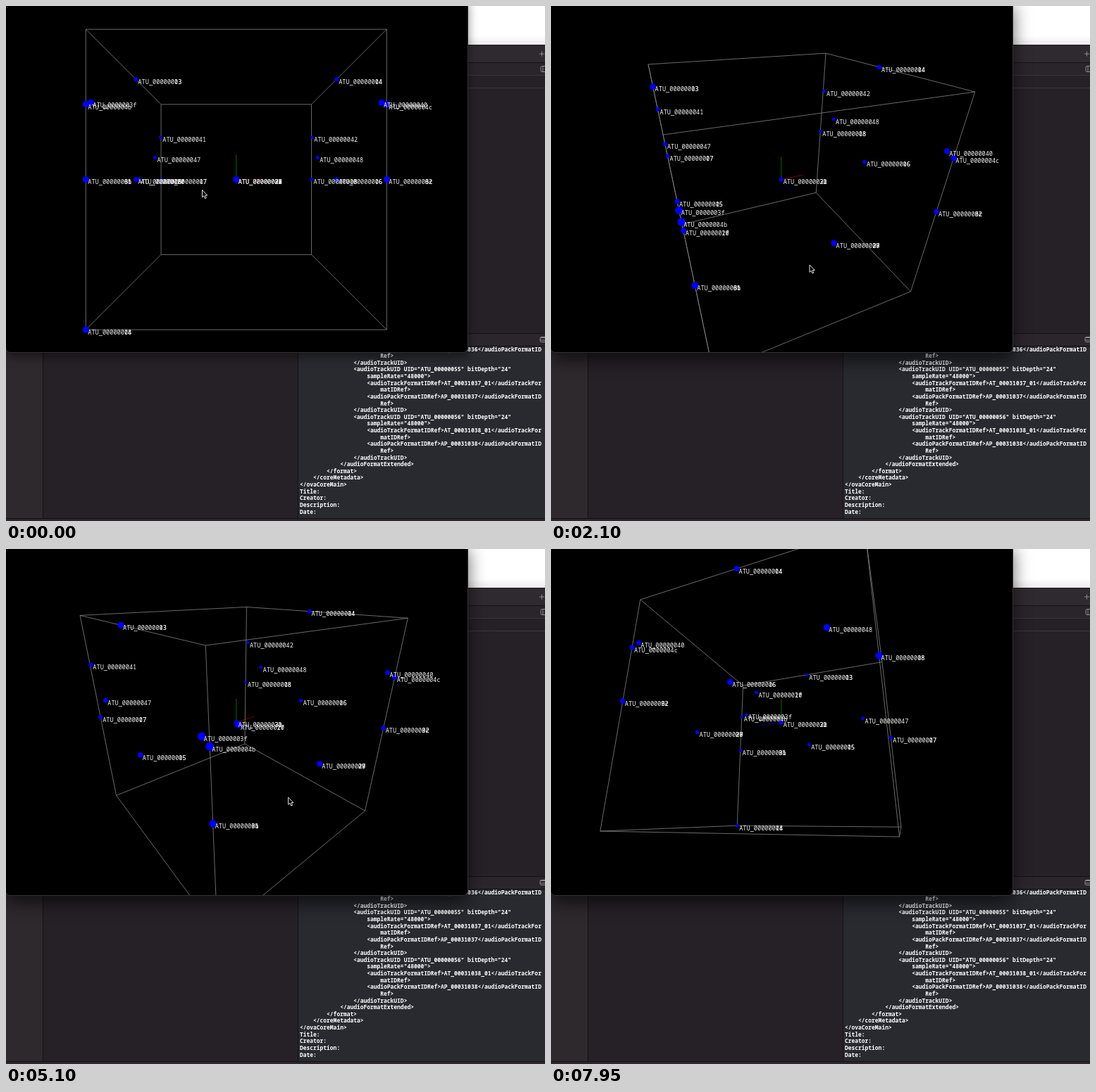
Write an HTML page that moves like this. It is 765x732 px and loops after 8 s.

```html
<!DOCTYPE html>
<html lang="en">
<head>
<meta charset="utf-8">
<title>Audio track viewer</title>
<style>
  html, body { margin: 0; width: 100%; height: 100%; overflow: hidden; background: #262127; }
  #stage { position: relative; width: 765px; height: 732px; overflow: hidden; background: #262127; }
  #stage > * { position: absolute; box-sizing: border-box; }
  .side { left: 0; top: 480px; width: 53px; height: 249px; background: #2e292d; border-right: 1px solid #131113; }
  .page { left: 640px; top: 0; width: 125px; height: 55px; background: linear-gradient(#fff 42px, #ececec); }
  .tabs { left: 640px; top: 55px; width: 125px; height: 26px; background: #2f2a2f; border-top: 1px solid #1c191c; border-bottom: 1px solid #151315; }
  .path { left: 640px; top: 81px; width: 125px; height: 18px; background: #2a252b; border-bottom: 1px solid #3a353b; }
  .crumb { left: 640px; top: 99px; width: 125px; height: 18px; border-bottom: 1px solid #3c373d; }
  .bar { left: 415px; top: 465px; width: 350px; height: 19px; background: #2b262c; border-top: 1px solid #131113; border-bottom: 1px solid #131113; }
  .log {
    left: 414px; top: 483.5px; width: 351px; height: 245px; margin: 0; padding-left: 2px;
    background: #292a30; border-left: 1px solid #131316; color: #fff; white-space: pre;
    font: bold 7.95px/9.625px "Noto Sans Mono", "DejaVu Sans Mono", monospace;
  }
  .foot { left: 0; top: 728px; width: 765px; height: 4px; background: #2b272c; border-top: 1px solid #131113; }
  .icons { left: 750px; top: 56px; width: 15px; height: 430px; fill: none; stroke: #8f8a90; }
  #win {
    left: -1px; top: -10px; width: 657px; height: 503px; background: #000;
    border: 1px solid #333; border-radius: 0 0 7px 7px;
    box-shadow: 0 6px 14px rgba(0, 0, 0, .45);
  }
  #win.active { box-shadow: 0 11px 25px rgba(0, 0, 0, .6); }
  #view { left: 0; top: 0; width: 655px; height: 492px; overflow: hidden; border-radius: 0 0 6px 6px; }
  #view text { fill: #f2f2f2; font: 8.6px "Noto Sans Mono", "DejaVu Sans Mono", monospace; }
  #view circle { fill: #00f; }
  #view line { stroke: #858585; stroke-width: .8; }
  #pointer { left: 0; top: 0; width: 765px; height: 732px; }
</style>
</head>
<body>
<div id="stage">
  <div class="side"></div>
  <div class="page"></div>
  <div class="tabs"></div>
  <div class="path"></div>
  <div class="crumb"></div>
  <div class="bar"></div>
  <pre class="log" id="log"></pre>
  <div class="foot"></div>
  <svg class="icons">
    <path d="M7 12h7M10.500 8.500v7M16 29.500h-5q-2 0-2 2v4q0 2 2 2h5M12 30v7M8 415.500h8M16 421.500h-6q-2 0-2-2v-3q0-2 2-2h6M8 419h8"/>
  </svg>
  <div id="win"></div>
  <svg id="view"></svg>
  <svg id="pointer">
    <path id="arrow" d="M0 0V10.300L2.300 8.300 4 12 5.800 11.200 4.200 7.600H7.200Z" fill="#000" stroke="#fff" stroke-width=".9"/>
  </svg>
</div>
<script>
const LOOP = 8000, STEP = 150, FOCUS = 450;
const FOCAL = 427, DIST = 3, CX = 326.8, CY = 246.6;
const CHAR = 5.16, RADIUS = .0215;

// time, yaw, pitch
const orbit = [
  [0, 0, 0], [FOCUS, 0, 0], [1050, 5.2, 10.4], [1500, 7, 20.5], [2100, 22.7, 30.3],
  [2850, 39.6, 24.2], [6300, 39.6, 24.2], [6600, 15, 25], [7950, -111, -17.8]
];
// time, x, y
const pointer = [
  [0, 278.5, 261.5], [1050, 313, 323], [2100, 367, 368], [2850, 402, 352],
  [6300, 400, 353.5], [7050, 200.5, 308], [7950, -90, 232]
];
// time, x, y, z
const travel = [
  [0, -1, 0, -.08], [2100, -1, 0, .43], [3000, -1, 0, .64], [3900, -.68, 0, .85],
  [4500, -.68, 0, .85], [5250, -.645, .565, .8], [6300, -.49, .56, .59], [7950, -.5, .61, .53]
];

// Left wall tracks: ids, y, z. The right wall mirrors them with the next id up.
const walls = [
  ["03 13", 1, 0], ["3f", .53, .93], ["4b", .5, 1], ["41", .557, -.97], ["47", .27, -.7],
  ["07 17", 0, -1], ["05 15", 0, 0], ["0b 31 51", 0, 1]
];
const ENDED = ["41", "42"], END_TIME = 6750;

const view = document.getElementById("view");
const win = document.getElementById("win");
const arrow = document.getElementById("arrow");

function set(el, attrs) {
  for (const name in attrs) el.setAttribute(name, attrs[name]);
}

function add(tag, attrs = {}, text = "") {
  const el = document.createElementNS("http://www.w3.org/2000/svg", tag);
  set(el, attrs);
  el.textContent = text;
  return view.appendChild(el);
}

function sample(keys, t) {
  const i = keys.findIndex(k => k[0] > t);
  if (i < 0) return keys[keys.length - 1].slice(1);
  const a = keys[i - 1], b = keys[i], u = (t - a[0]) / (b[0] - a[0]);
  return a.slice(1).map((v, n) => v + (b[n + 1] - v) * u);
}

function projector([yaw, pitch]) {
  const rad = Math.PI / 180;
  const c = Math.cos(yaw * rad), s = Math.sin(yaw * rad);
  const cp = Math.cos(pitch * rad), sp = Math.sin(pitch * rad);
  return ([x, y, z]) => {
    const rx = x * c + z * s, rz = z * c - x * s;
    const scale = FOCAL / (DIST - y * sp - rz * cp);
    return { x: CX + rx * scale, y: CY - (y * cp - rz * sp) * scale, scale };
  };
}

// Cube edges: one per axis and pair of signs on the other two axes.
const lines = [];
["#a00000", "#008a00", "#0000b4"].forEach((color, axis) => {
  const point = (along, p, q) => {
    const v = [];
    v[axis] = along;
    v[(axis + 1) % 3] = p;
    v[(axis + 2) % 3] = q;
    return v;
  };
  for (const p of [-1, 1]) for (const q of [-1, 1]) {
    lines.push({ ends: [point(-1, p, q), point(1, p, q)], el: add("line") });
  }
  lines.push({ ends: [point(0, 0, 0), point(.25, 0, 0)], el: add("line", { style: "stroke:" + color }) });
});

const nextId = id => (parseInt(id, 16) + 1).toString(16).padStart(2, "0");
const track = (ids, ...pos) => ({ ids, pos });
const mover = track(["1f", "20"], 0, 0, 0);
const tracks = [
  ...walls.flatMap(([list, y, z]) => {
    const ids = list.split(" ");
    return [track(ids, -1, y, z), track(ids.map(nextId), 1, y, z)];
  }),
  track(["14", "08"], -1, -1, 1),
  track(["09", "27", "28"], 0, 0, 1),
  track(["21", "2b", "32"], 0, 0, 0),
  mover
];
for (const item of tracks) item.dot = add("circle");
for (const item of tracks) {
  item.labels = item.ids.map((id, i) => add("text", {}, i ? id : "ATU_000000" + id));
}

function draw(t) {
  const project = projector(sample(orbit, t));
  mover.pos = sample(travel, t);
  for (const { ends, el } of lines) {
    const [a, b] = ends.map(project);
    set(el, { x1: a.x, y1: a.y, x2: b.x, y2: b.y });
  }
  for (const { ids, pos, dot, labels } of tracks) {
    const p = project(pos);
    const display = ENDED.includes(ids[0]) && t >= END_TIME ? "none" : "inline";
    set(dot, { cx: p.x, cy: p.y, r: p.scale * RADIUS, display });
    labels.forEach((el, i) => {
      set(el, { x: p.x + 3 + (i ? 10 * CHAR : 0), y: p.y + 6.8, display });
    });
  }
  set(arrow, { transform: `translate(${sample(pointer, t).join(" ")})` });
  win.classList.toggle("active", t >= FOCUS);
}

function packLog(n) {
  return [
    [20, `<audioPackFormatIDRef>AP_000310${n}</audioPackFormatID`],
    [24, "Ref>"],
    [16, "</audioTrackUID>"]
  ];
}

function trackLog(n) {
  return [
    [16, `<audioTrackUID UID="ATU_000000${n + 18}" bitDepth="24"`],
    [20, 'sampleRate="48000">'],
    [20, `<audioTrackFormatIDRef>AT_000310${n}_01</audioTrackFor`],
    [24, "matIDRef>"],
    ...packLog(n)
  ];
}

document.getElementById("log").textContent = [
  ...packLog(36), ...trackLog(37), ...trackLog(38),
  [12, "</audioFormatExtended>"], [8, "</format>"], [4, "</coreMetadata>"],
  [0, "</ovaCoreMain>"], [0, "Title:"], [0, "Creator:"], [0, "Description:"], [0, "Date:"]
].map(([indent, text]) => " ".repeat(indent) + text).join("\n");

const start = performance.now();
let last = -1;
function tick() {
  const t = Math.floor((performance.now() - start) % LOOP / STEP) * STEP;
  if (t !== last) draw(last = t);
  requestAnimationFrame(tick);
}
tick();
</script>
</body>
</html>
```
